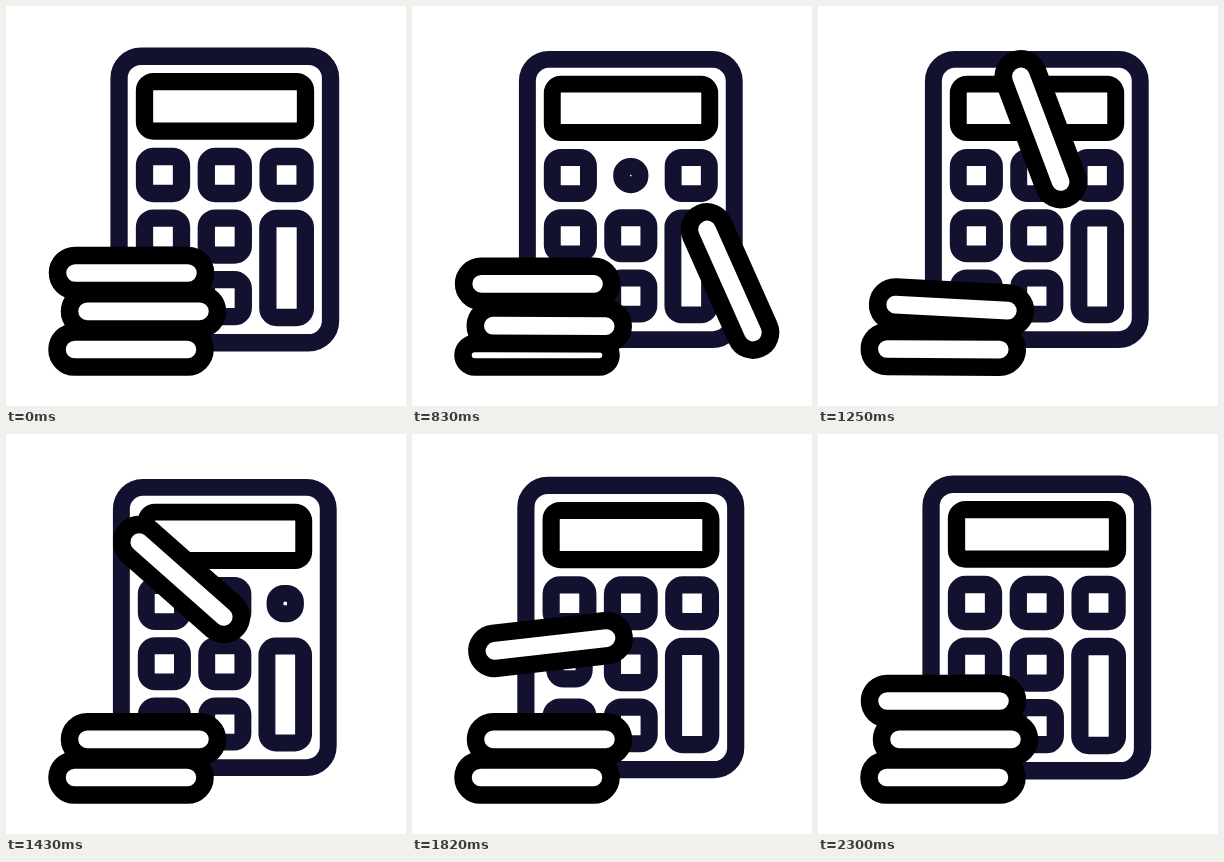
Recreate the animation shown at these times as an HTML page with a canvas. Size 400 by 400 pixels, loop 2.33 s.

```html
<!DOCTYPE html>
<html lang="en">
<head>
<meta charset="utf-8">
<title>Calculator and coins</title>
<style>
  html, body { margin: 0; width: 100%; height: 100%; overflow: hidden; background: #fff; }
  canvas { display: block; width: 400px; height: 400px; }
</style>
</head>
<body>
<canvas id="stage" width="400" height="400"></canvas>
<script>
const ctx = document.getElementById('stage').getContext('2d');
const LOOP = 2330, START = 530, STEP = 30, BOUNCE = 830;
const NAVY = '#121130', BLACK = '#000', COIN_HEIGHT = 35.2;

// Resting places of the stacked coins
const TOP = [125.5, 267], MIDDLE = [137.5, 305.3], BOTTOM = [125, 343.5];

// Flight from the bounce to the stack: [time, x, y, degrees]
const FLIGHT = [
  [BOUNCE, 318, 275, 66], [1070, 275, 130, -66.5], [1430, 175.5, 145.5, -138.5],
  [1820, 138.5, 210.5, -186.5], [2300, ...TOP, -180]
];

// Deepest press of each button, row by row; the others stay still
const PRESSES = [620, 840, 1400, 1747, 1075];

const mix = (a, b, u) => a + (b - a) * u;

function ease(t, from, to) {
  const u = Math.min(1, Math.max(0, (t - from) / (to - from)));
  return (1 - Math.cos(Math.PI * u)) / 2;
}

// Smooth curve through the keys, ending at rest
function follow(keys, t) {
  let i = 0;
  while (i < keys.length - 2 && t >= keys[i + 1][0]) i++;
  const [a, b] = [keys[i], keys[i + 1]];
  const span = b[0] - a[0], u = Math.min(1, (t - a[0]) / span);
  const slope = (k, c) => {
    const p = keys[Math.max(0, k - 1)], n = keys[k + 1];
    return n ? (n[c] - p[c]) / (n[0] - p[0]) * span : 0;
  };
  return [1, 2, 3].map(c => mix(a[c], b[c], u * u * (3 - 2 * u))
    + slope(i, c) * u * (1 - u) ** 2 - slope(i + 1, c) * u * u * (1 - u));
}

function box(cx, cy, w, h, r, color, width = 17.3) {
  ctx.beginPath();
  ctx.roundRect(cx - w / 2, cy - h / 2, w, h, r);
  ctx.fillStyle = '#fff';
  ctx.fill();
  ctx.strokeStyle = color;
  ctx.lineWidth = width;
  ctx.stroke();
}

function coin(x, y, degrees = 0, height = COIN_HEIGHT) {
  ctx.save();
  ctx.translate(x, y);
  ctx.rotate(degrees * Math.PI / 180);
  box(0, 0, 148, height, height / 2, BLACK, 17.5);
  ctx.restore();
}

// Drops one place, then slides sideways with a slight tilt
function sinkingCoin(from, to, p) {
  const slide = p ** 4;
  coin(mix(from[0], to[0], slide), mix(from[1], to[1], p), 3.5 * Math.sin(Math.PI * slide));
}

function collapsingCoin(t) {
  const u = Math.max(0, (t - START) / 520);
  if (u >= 1) return;
  const lost = COIN_HEIGHT * u * u;
  coin(BOTTOM[0], BOTTOM[1] + lost / 2, 0, COIN_HEIGHT - lost);
}

function flyingCoin(t) {
  if (t >= BOUNCE) return coin(...follow(FLIGHT, t));
  const u = Math.max(0, (t - START) / (BOUNCE - START));
  coin(mix(300, 318, u), mix(-36, 275, u * u), mix(180, 66, u));
}

function buttonSize(t, peak) {
  const d = Math.abs(t - peak) / 130;
  return d < 1 ? 37 - 9.25 * (1 + Math.cos(Math.PI * d)) : 37;
}

function calculator(t) {
  const s = 1 - 0.022 * (ease(t, 490, 620) - ease(t, 1400, 2110));
  ctx.save();
  ctx.translate(219, 193.5);
  ctx.scale(s, s);
  ctx.translate(-219, -193.5);
  box(218.8, 193.5, 211.5, 286.5, 22, NAVY);
  box(219, 100.3, 161, 49.5, 9, BLACK);
  for (let i = 0; i < 8; i++) {
    const col = i < 5 ? i % 3 : (i - 6 + 3) % 3;
    if (i === 5) {
      box(280.6, 262, 37.5, 99, 9, NAVY);
      continue;
    }
    const size = buttonSize(t, PRESSES[i] ?? Infinity);
    box(157 + 61.8 * col, 169 + 61.6 * Math.floor(i / 3), size, size, 9, NAVY);
  }
  ctx.restore();
}

function draw(t) {
  ctx.fillStyle = '#fff';
  ctx.fillRect(0, 0, 400, 400);
  calculator(t);
  collapsingCoin(t);
  sinkingCoin(MIDDLE, BOTTOM, ease(t, 490, 1290));
  sinkingCoin(TOP, MIDDLE, ease(t, 490, 1440));
  flyingCoin(t);
}

function tick() {
  const t = performance.now() % LOOP;
  draw(t < START ? 0 : START + STEP * Math.floor((t - START) / STEP));
  requestAnimationFrame(tick);
}
tick();
</script>
</body>
</html>
```
